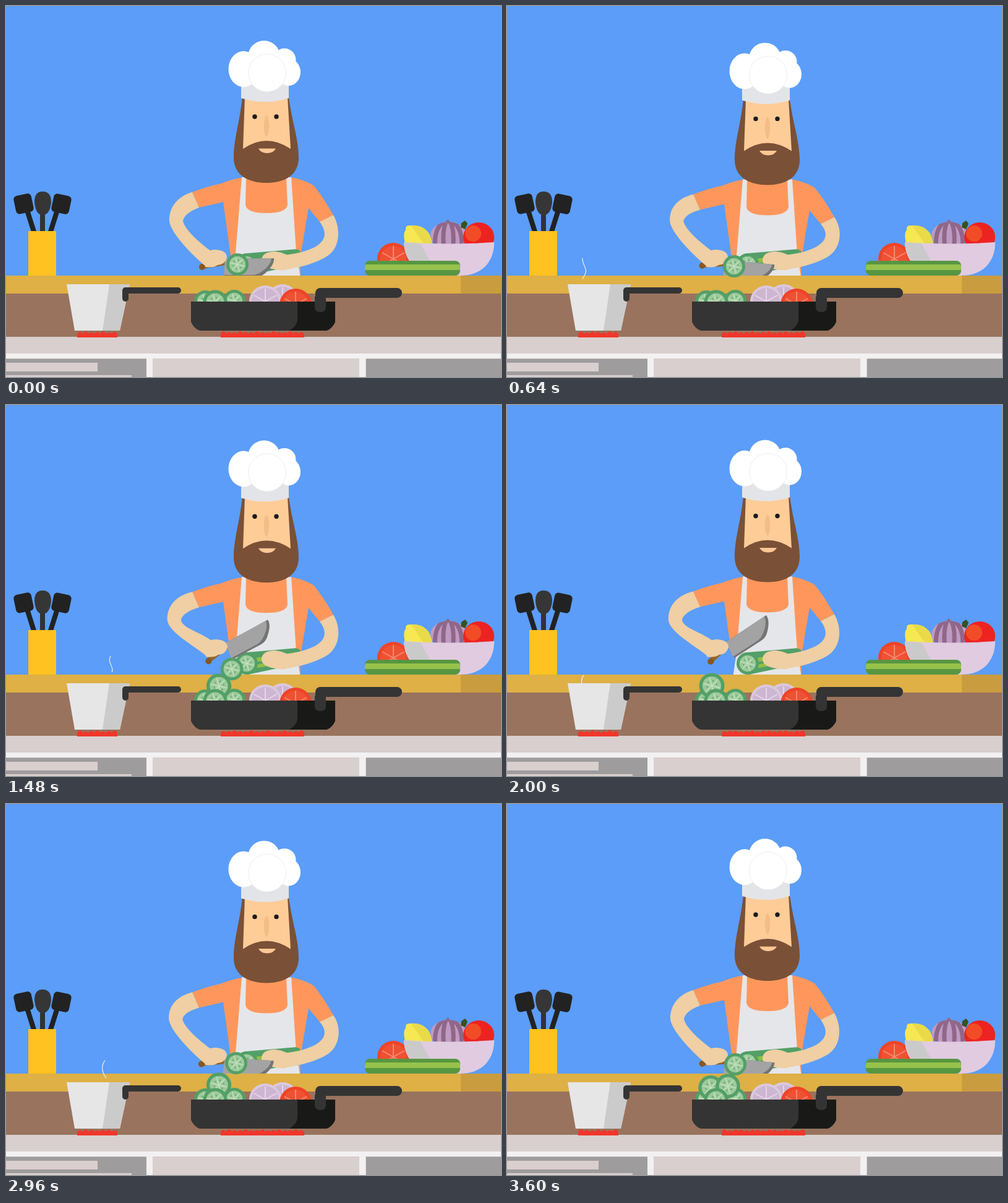
An HTML page for the animation above (3.64 s loop, 800 by 600 pixels).

```html
<!DOCTYPE html>
<html lang="en">
<head>
<meta charset="utf-8">
<title>Cook at the stove</title>
<style>
html, body { margin: 0; width: 100%; height: 100%; overflow: hidden; background: #5b9df8; }
svg { display: block; width: 800px; height: 600px; }
</style>
</head>
<body>
<svg viewBox="0 0 800 600" xmlns="http://www.w3.org/2000/svg">
  <defs>
    <g id="slice">
      <circle r="18" fill="#539f67"/>
      <circle r="13.2" fill="#9cca9b"/>
      <g id="spokes" stroke="#c6e0c2" stroke-width="1.4"></g>
      <g id="seeds" fill="#68aa70"></g>
    </g>
    <g id="wheel">
      <path d="M0-21V21M-18-10L18 10M-18 10L18-10" fill="none" stroke-width="2"/>
    </g>
    <g id="tomato">
      <circle r="26" fill="#ee4428"/>
      <circle r="21" fill="#ef5133"/>
      <use href="#wheel" stroke="#f58a70"/>
    </g>
    <g id="onion">
      <circle r="26" fill="#dcc8de"/>
      <circle r="22" fill="#cdb6d1"/>
      <use href="#wheel" stroke="#e5d6e7"/>
    </g>
    <clipPath id="abovePot"><rect width="800" height="450"/></clipPath>
    <clipPath id="panTop"><rect width="800" height="480"/></clipPath>
    <clipPath id="onionClip"><ellipse cx="715" cy="371" rx="29" ry="22"/></clipPath>
  </defs>

  <rect width="800" height="600" fill="#5b9df8"/>

  <g id="body">
    <path fill="#ff975c" d="M382 277Q362 281 348 287Q325 292 301 301L312 326L351 317L363 404H371L366 440H476L475 410L489 327L507 349L529 338Q512 308 497 290Q482 281 461 277Z"/>
    <path fill="#e5e6ea" d="M381 277H388L387 322Q390 335 421 335Q452 335 455 322L453 277H461L469 398L476 440H365L371 400Z"/>
    <path fill="#fecc97" d="M384 146H457L463 240H378Z"/>
    <ellipse cx="421" cy="194" rx="4.2" ry="17" fill="#f3bd88"/>
    <path fill="#7a5037" d="M382 147H386L383 231Q421 205 460 231L455 147H457C462 187 473 215 473 245C473 274 450 286 421 286C392 286 368 274 368 245C368 215 378 187 382 147Z"/>
    <path fill="#fec795" d="M408 230.500H436Q432 238 422 238Q412 238 408 230.500Z"/>
    <circle cx="402" cy="179" r="3.7" fill="#1b1b1b"/>
    <circle cx="437" cy="179" r="3.7" fill="#1b1b1b"/>
    <path fill="#e3e4e8" d="M380 120H457V149Q419 161 380 149Z"/>
    <g fill="#fff">
      <ellipse cx="384" cy="102" rx="24.500" ry="29"/>
      <circle cx="417" cy="82" r="26"/>
      <circle cx="450" cy="87" r="18.500"/>
      <ellipse cx="457" cy="107" rx="19" ry="22"/>
      <circle cx="422" cy="108" r="30.500" stroke="#eeeff1"/>
    </g>
  </g>

  <g transform="translate(389 418) rotate(-9)">
    <path fill="#539f67" d="M0-18L82-12Q91-10 90 0Q89 13 80 14L0 18Z"/>
    <path fill="#91bf45" d="M8-7L84-5V8L8 10Z"/>
    <path fill="#539f67" d="M10 0L84 1V4L10 4Z"/>
  </g>
  <use href="#slice" x="389" y="418"/>
  <g fill="#efcfa3">
    <path id="rightArm"/>
    <path d="M413 411Q414 397 435 397Q450 399 458 405L453 427Q436 428 423 423Q413 419 413 411Z"/>
  </g>

  <g id="knife">
    <path d="M18 8L-18 14" stroke="#95642a" stroke-width="8" stroke-linecap="round"/>
    <circle cx="-19" cy="15" r="5" fill="#87571f"/>
    <path fill="#757475" d="M18 2L97 1Q98 12 82 26Q76 31 68 31L16 31Z"/>
    <path fill="#a3a3a4" d="M18 2L93 1Q93 11 78 22Q70 28 61 28L16 28Z"/>
  </g>
  <g fill="#efcfa3">
    <path id="leftArm"/>
    <path id="hand" d="M-17 4Q-18-12 2-13Q21-12 21 0Q18 11 6 12Q-1 17-14 15Z"/>
  </g>

  <rect y="436" width="800" height="30" fill="#deb045"/>
  <rect x="735" y="436" width="65" height="30" fill="#ca9c40"/>
  <rect y="465" width="800" height="70" fill="#99735e"/>
  <rect y="535" width="800" height="65" fill="#d9cfce"/>
  <path fill="#f2f1f2" d="M0 562H800V570H581V600H571V570H237V600H227V570H0Z"/>
  <path fill="#9f9c9d" d="M0 570.500H227V600H0ZM582 570.500H800V600H582Z"/>
  <path fill="#d9cfce" d="M0 577H148V591H0ZM0 597H203V600H0Z"/>

  <!-- utensils -->
  <g fill="#222" stroke="#222">
    <path d="M34 330L46 368M83 330L71 368" stroke-width="8"/>
    <path d="M59 330V368" stroke="#333" stroke-width="8"/>
    <rect x="14" y="305" width="29" height="30" rx="6" transform="rotate(-12 28 320)" stroke="none"/>
    <rect x="75" y="305" width="29" height="30" rx="6" transform="rotate(12 89 320)" stroke="none"/>
    <path d="M46 317Q46 300 59 300Q73 300 73 317Q71 338 59 338Q48 338 46 317Z" fill="#363636" stroke="none"/>
  </g>
  <rect x="36" y="364" width="45" height="72" fill="#ffc220"/>

  <!-- bowl and vegetables -->
  <use href="#tomato" x="626" y="409"/>
  <path fill="#f6e753" d="M645 384Q641 368 646 362Q645 354 653 355Q672 353 682 366Q688 374 689 386Z"/>
  <path fill="#e9da49" d="M655 355Q674 354 684 368L689 386H676Z"/>
  <path fill="#906789" d="M706 354L714 345L722 354Z"/>
  <ellipse cx="715" cy="371" rx="29" ry="22" fill="#be9bc2"/>
  <g clip-path="url(#onionClip)" fill="none" stroke="#906789" stroke-width="7">
    <path d="M711 346Q690 358 694 394M713 346Q704 360 708 394M716 346Q726 360 722 394M718 346Q740 358 736 394"/>
  </g>
  <ellipse cx="764" cy="374" rx="25" ry="24" fill="#ed2321"/>
  <circle cx="755" cy="368" r="13" fill="#f24c27"/>
  <path d="M736 351L742 347L746 352L742 361L735 358Z" fill="#36521f"/>
  <path fill="#e1cbe0" d="M643 382Q716 387 789 382C789 413 770 436 734 436H700C665 434 643 412 643 382Z"/>
  <path fill="#cbcacb" d="M643 382L670 384L686 414H655Q644 400 643 382Z"/>
  <rect x="580" y="412" width="154" height="24" rx="8" fill="#579642"/>
  <path fill="#96c24c" d="M581 418H733L734 422V427H580V422Z"/>

  <!-- pot -->
  <g id="steam" clip-path="url(#abovePot)" fill="none" stroke="#e9f1fc" stroke-width="1.2"></g>
  <path id="flames" fill="#f0362b"/>
  <path fill="#e6e6e6" d="M98 450H200L184 525H111Z"/>
  <path fill="#cbcbcb" d="M167 450H200L184 525H156Z"/>
  <path fill="none" stroke="#343434" stroke-width="10" stroke-linecap="round" stroke-linejoin="round" d="M193 473V460H278"/>

  <!-- pan -->
  <use href="#slice" x="322" y="478"/>
  <use href="#slice" x="369" y="477"/>
  <g id="falling"></g>
  <g clip-path="url(#panTop)">
    <use href="#slice" transform="translate(338 479) scale(1.1)"/>
    <use href="#onion" x="447" y="476"/>
    <use href="#onion" x="419" y="478"/>
    <use href="#tomato" x="468" y="483"/>
  </g>
  <path fill="#343434" d="M299 478H532V511Q527 522 518 525H313Q304 522 299 511Z"/>
  <path fill="#191a17" d="M471 478H532V511Q527 522 518 525H458Q471 517 471 506Z"/>
  <path fill="none" stroke="#343434" stroke-linecap="round" stroke-linejoin="round" d="M508 486V464H632" stroke-width="16"/>
  <path fill="#343434" d="M499 470H517V487Q517 495 508 495Q499 495 499 487Z"/>
</svg>

<script>
const LOOP = 3640, STEP = 40;
const $ = id => document.getElementById(id);

function add(parent, tag, attrs) {
  const el = document.createElementNS('http://www.w3.org/2000/svg', tag);
  for (const k in attrs) el.setAttribute(k, attrs[k]);
  return parent.appendChild(el);
}

// Linear interpolation through rows of [time, value, value...]
function track(keys, t) {
  if (t <= keys[0][0]) return keys[0].slice(1);
  for (let i = 1; i < keys.length; i++) {
    const a = keys[i - 1], b = keys[i];
    if (t <= b[0]) {
      const k = (t - a[0]) / (b[0] - a[0]);
      return a.slice(1).map((v, j) => v + (b[j + 1] - v) * k);
    }
  }
  return keys[keys.length - 1].slice(1);
}

for (let i = 0; i < 6; i++) {
  const a = i * Math.PI / 3 + 0.25, b = a + Math.PI / 6;
  add($('spokes'), 'path', { d: `M0 0L${12 * Math.cos(a)} ${12 * Math.sin(a)}` });
  add($('seeds'), 'circle', { cx: 7 * Math.cos(b), cy: 7 * Math.sin(b), r: 1.2 });
}

const cuts = [-15, 540, 820, 1120, 1320, 1540, 2240, 2600, 2920, 3120, 3340, 3520];
// time, x, y, scale
const fall = [
  [0, 375, 418, 1], [15, 374, 418, 1], [80, 369, 421, 1], [100, 367, 421, 1], [160, 365, 427, 1.02],
  [260, 357, 456, 1.1], [360, 344, 454.5, 1.12], [460, 331, 454, 1.14], [560, 322, 478, 1]
];
const lift = [[0, -6], [15, 0], [50, 6], [105, 6], [160, -28], [260, -33]];
const drop = [[-120, -33], [-60, -28], [0, -6]];
const slices = cuts.map(() => add($('falling'), 'use', { href: '#slice' }));

const wisps = [
  { start: 0, speed: 66, x: 122, d: 'M0 0C-1 10 8 16 5 24S0 32 0 34' },
  { start: 850, speed: 70, x: 169, d: 'M0 0C-4 7 0 12 2 18Q4 23 2 26' },
  { start: 1800, speed: 66, x: 124, d: 'M0 0Q-7 10 0 21' },
  { start: 2530, speed: 82, x: 160, d: 'M0 0C-7 9-5 19 2 29' }
];
for (const w of wisps) w.el = add($('steam'), 'path', { d: w.d });

function knifeAngle(t) {
  let angle = -33;
  for (const c of cuts) {
    const u = t - c;
    angle = Math.max(angle, track(u < 0 ? drop : lift, u)[0]);
  }
  return angle;
}

function flameRow(x0, x1, t) {
  const n = Math.round((x1 - x0) / 9), w = (x1 - x0) / n;
  let d = `M${x0} 536V530`;
  for (let i = 0; i < n; i++) {
    const h = 6 + 2 * Math.sin(t / 70 + i * 2.1);
    d += `q${w / 2} ${-h} ${w} 0`;
  }
  return d + 'V536Z';
}

function draw(t) {
  const dy = 2.1 * (1 - Math.cos(t * Math.PI / 900));
  $('body').setAttribute('transform', `translate(0 ${dy})`);

  const angle = knifeAngle(t);
  const up = Math.min(1, Math.max(0, (-angle - 6) / 21));
  const hx = 336 + up, hy = 407 - 15 * up;
  $('knife').setAttribute('transform', `translate(${hx} ${hy}) rotate(${angle})`);
  $('hand').setAttribute('transform', `translate(${hx} ${hy})`);

  const ex = 264 - 3 * up - dy / 4;
  $('leftArm').setAttribute('d',
    `M301 ${301 + dy}C${ex + 18} ${306 + dy} ${ex - 1} 322 ${ex} 348` +
    `C${ex + 2} 367 ${hx - 35} ${hy - 4} ${hx - 13} ${hy + 14}L${hx - 5} ${hy - 11}` +
    `C${hx - 26} ${hy - 26} ${ex + 25} 361 ${ex + 22} 348Q${ex + 24} ${335 + dy / 2} 312 ${326 + dy}Z`);
  const rx = 538 + dy / 4;
  $('rightArm').setAttribute('d',
    `M507 ${349 + dy}L529 ${338 + dy}C${rx + 2} 357 ${rx + 4} 388 ${rx - 18} 404` +
    `C${rx - 38} 417 470 424 447 427L446 403C465 402 485 397 499 390Q526 375 507 ${349 + dy}Z`);

  slices.forEach((el, i) => {
    const u = t - cuts[i], on = u >= 0 && u < 560;
    el.setAttribute('visibility', on ? 'visible' : 'hidden');
    if (on) {
      const [x, y, s] = track(fall, u);
      el.setAttribute('transform', `translate(${x} ${y}) scale(${s})`);
    }
  });

  for (const w of wisps) {
    const u = t - w.start;
    const alpha = u <= 0 ? 0 : Math.min(1, Math.max(0, (980 - u) / 150));
    w.el.setAttribute('opacity', alpha);
    w.el.setAttribute('transform', `translate(${w.x} ${450 - w.speed * u / 1000})`);
  }

  $('flames').setAttribute('d', flameRow(115, 180, t) + flameRow(347, 482, t + 90));
}

function tick() {
  draw(Math.floor(performance.now() % LOOP / STEP) * STEP);
  requestAnimationFrame(tick);
}
tick();
</script>
</body>
</html>
```
